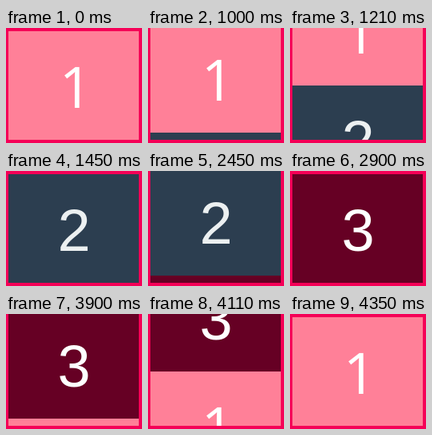
Write an HTML page with a canvas that moves like this. It is 170x144 px and loops after 4.38 s.

```html
<!DOCTYPE html>
<html lang="en">
<head>
<meta charset="utf-8">
<title>Vertical slides</title>
<style>
  html, body { margin: 0; width: 100%; height: 100%; overflow: hidden; background: #f50057; }
  canvas { display: block; }
</style>
</head>
<body>
<canvas id="stage" width="170" height="144"></canvas>
<script>
const ctx = document.getElementById('stage').getContext('2d');
const LOOP = 4380, CYCLE = 1450, HOLD = 1000, STEP = 30, STEPS = 16;
const LEFT = 3, TOP = 4, WIDTH = 163, HEIGHT = 136;
const sans = '74px "Liberation Sans", Arial, sans-serif';
const slides = [
  // The footless 1 sits slightly right of centre.
  { label: '1', bg: '#ff8098', ink: '#ffffff', font: '72px "Open Sans", sans-serif', x: 87 },
  { label: '2', bg: '#2c3e50', ink: '#ecf0f1', font: sans, x: 85 },
  { label: '3', bg: '#660024', ink: '#ffffff', font: sans, x: 85 }
];

function drawSlide(index, y) {
  const s = slides[index % slides.length];
  ctx.fillStyle = s.bg;
  ctx.fillRect(LEFT, y, WIDTH, HEIGHT);
  ctx.fillStyle = s.ink;
  ctx.font = s.font;
  ctx.fillText(s.label, s.x, y + 96);
}

function draw(now) {
  const t = now % LOOP;
  const index = Math.floor(t / CYCLE);
  const moving = t % CYCLE - HOLD;
  const step = moving < 0 ? 0 : Math.floor(moving / STEP) + 1;
  const shift = Math.round(HEIGHT * step / STEPS);

  ctx.fillStyle = '#f50057';
  ctx.fillRect(0, 0, 170, 144);
  ctx.save();
  ctx.beginPath();
  ctx.rect(LEFT, 0, WIDTH, TOP + HEIGHT);
  ctx.clip();
  ctx.textAlign = 'center';
  drawSlide(index, TOP - shift);
  if (step) drawSlide(index + 1, TOP + HEIGHT - shift);
  ctx.restore();
}

const start = performance.now();
function frame() {
  draw(performance.now() - start);
  requestAnimationFrame(frame);
}
frame();
</script>
</body>
</html>
```
